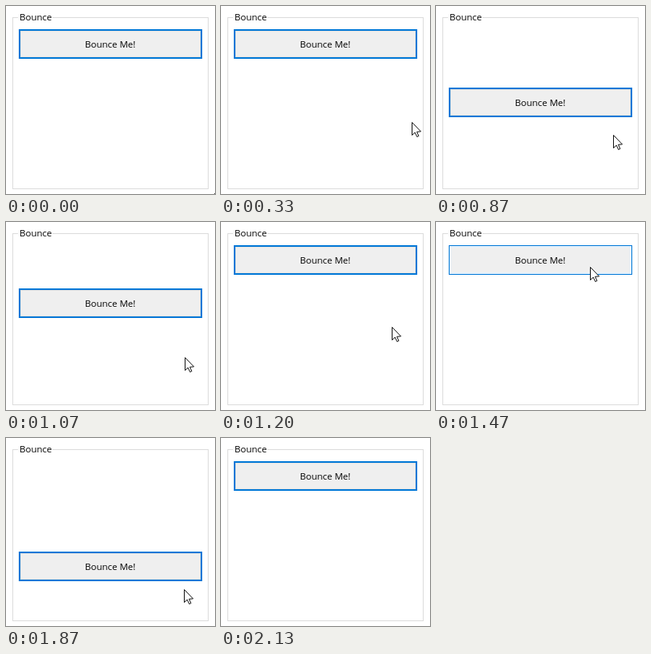
These frames come from a looping animation (262 px wide and 235 px high, 2340 ms). An HTML page with a canvas:

```html
<!DOCTYPE html>
<html lang="en">
<head>
<meta charset="utf-8">
<title>Bounce</title>
<style>
html, body { margin: 0; width: 100%; height: 100%; overflow: hidden; background: #fff; }
canvas { display: block; }
</style>
</head>
<body>
<canvas id="stage" width="262" height="235"></canvas>
<script>
const ctx = document.getElementById('stage').getContext('2d');
const LOOP = 2340, STEP = 1000 / 15;
const BLUE = '#0078d7', FACE = '#efefef', LINE = '#dcdcdc';
const BTN = { x: 16, y: 29, w: 230, h: 37 };

// Button drops under gravity and rebounds; times are in steps.
const DROP = 163, HALF = 4, STARTS = [10.31, 23.34];

// Where the pointer turns or rests
const STOPS = [
  { s: 1, x: 261, y: 234 },
  { s: 9, x: 217, y: 56 },
  { s: 10, x: 217, y: 60 },
  { s: 13, x: 222, y: 161 },
  { s: 16, x: 224, y: 169 },
  { s: 22, x: 193, y: 56 },
  { s: 23, x: 193, y: 56 },
  { s: 28, x: 223, y: 189 },
  { s: 32, x: 229, y: 240 }
];

function rect(color, x, y, w, h) {
  ctx.fillStyle = color;
  ctx.fillRect(x, y, w, h);
}

function text(str, x, y) {
  ctx.fillStyle = '#000';
  ctx.font = '11.5px "Open Sans", "Noto Sans", sans-serif';
  ctx.fillText(str, x, y);
}

function buttonTop(s) {
  let top = BTN.y;
  for (const start of STARTS) {
    const d = Math.max(0, 1 - Math.abs((s - start) / HALF - 1));
    top += Math.floor(DROP * d * d);
  }
  return top;
}

function pointerAt(s) {
  const i = STOPS.findIndex(p => p.s >= s);
  if (i === 0) return STOPS[0];
  if (i < 0) return STOPS[STOPS.length - 1];
  const a = STOPS[i - 1], b = STOPS[i], k = (s - a.s) / (b.s - a.s);
  const mix = (u, v) => Math.round(u + (v - u) * k);
  return { x: mix(a.x, b.x), y: mix(a.y, b.y) };
}

function drawGroup() {
  rect(LINE, 8, 14, 246, 215);
  rect('#fff', 9, 15, 244, 213);
  rect('#fff', 15, 13, 43, 3);
  text('Bounce', 17, 18);
}

function drawButton(y, hover) {
  const inset = (color, d) => rect(color, BTN.x + d, y + d, BTN.w - 2 * d, BTN.h - 2 * d);
  inset(BLUE, 0);
  inset(hover ? '#e5f1fb' : '#e1e1e1', hover ? 1 : 2);
  inset(FACE, 3);
  text('Bounce Me!', 99, y + 23);
}

function drawPointer(x, y) {
  ctx.save();
  ctx.translate(x + 0.5, y + 0.5);
  ctx.beginPath();
  ctx.moveTo(0, 0);
  ctx.lineTo(0, 16);
  ctx.lineTo(3.7, 12.6);
  ctx.lineTo(6.2, 18);
  ctx.lineTo(8.4, 17);
  ctx.lineTo(6, 11.8);
  ctx.lineTo(11, 11.4);
  ctx.closePath();
  ctx.fillStyle = '#fff';
  ctx.fill();
  ctx.strokeStyle = '#111';
  ctx.lineJoin = 'round';
  ctx.stroke();
  ctx.restore();
}

function draw(now) {
  const s = Math.floor((now % LOOP + 3.4) / STEP);
  const y = buttonTop(s), p = pointerAt(s);
  const hover = p.x >= BTN.x && p.x < BTN.x + BTN.w && p.y >= y && p.y < y + BTN.h;
  rect('#fff', 0, 0, 262, 235);
  drawGroup();
  drawButton(y, hover);
  drawPointer(p.x, p.y);
}

const begin = performance.now();
function tick() {
  draw(performance.now() - begin);
  requestAnimationFrame(tick);
}
tick();
</script>
</body>
</html>
```
